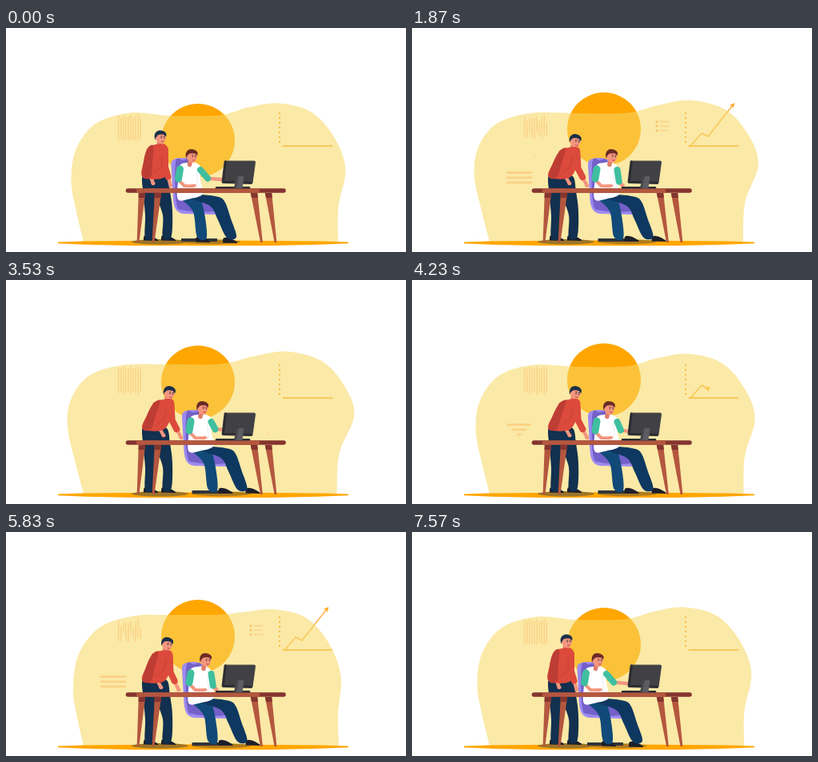
Write an HTML page with a canvas that moves like this. It is 500 by 281 pixels and loops after 7630 ms.

```html
<!DOCTYPE html>
<html lang="en">
<head>
<meta charset="utf-8">
<title>Two colleagues at a desk</title>
<style>
  html, body { margin: 0; width: 100%; height: 100%; overflow: hidden; background: #fff; }
  canvas { display: block; width: 500px; height: 281px; }
</style>
</head>
<body>
<canvas id="stage"></canvas>
<script>
const LOOP = 7630;
const canvas = document.getElementById('stage');
const ratio = window.devicePixelRatio || 1;
canvas.width = Math.round(500 * ratio);
canvas.height = Math.round(281 * ratio);
const c = canvas.getContext('2d');

const SKIN = '#f3967f', RED = '#dc4a3c', DARK_RED = '#bd3d34', NAVY = '#12304f';
const ORANGE = '#ffa600', SOFT = '#fbd083', TEAL = '#3fbf9f', INK = '#1d1f2b';
const WOOD = '#b4573f', DARK_WOOD = '#84352f';

const clamp = v => Math.max(0, Math.min(1, v));
const mix = (a, b, k) => a + (b - a) * k;
const mixPt = (p, q, k) => [mix(p[0], q[0], k), mix(p[1], q[1], k)];
const ease = (t, a, b) => (1 - Math.cos(Math.PI * clamp((t - a) / (b - a)))) / 2;
// Rises from 0 to 1 between a and b, falls back between d and e.
const pulse = (t, a, b, d, e) => ease(t, a, b) - ease(t, d, e);

function fill(color) {
  c.fillStyle = color;
  c.fill();
}

function poly(pts, color) {
  c.beginPath();
  pts.forEach(p => c.lineTo(...p));
  c.closePath();
  fill(color);
}

// Catmull-Rom outline; an open one closes with a straight edge.
function smooth(pts, color, open) {
  const n = pts.length;
  const at = i => pts[open ? Math.max(0, Math.min(n - 1, i)) : (i + n) % n];
  c.beginPath();
  c.moveTo(...pts[0]);
  for (let i = 0; i < (open ? n - 1 : n); i++) {
    const [a, b, d, e] = [at(i - 1), at(i), at(i + 1), at(i + 2)];
    c.bezierCurveTo(b[0] + (d[0] - a[0]) / 6, b[1] + (d[1] - a[1]) / 6,
      d[0] - (e[0] - b[0]) / 6, d[1] - (e[1] - b[1]) / 6, d[0], d[1]);
  }
  c.closePath();
  fill(color);
}

function line(pts, width, color, cap = 'round') {
  c.beginPath();
  pts.forEach(p => c.lineTo(...p));
  c.lineWidth = width;
  c.strokeStyle = color;
  c.lineCap = cap;
  c.lineJoin = 'round';
  c.stroke();
}

function oval(x, y, rx, ry, color) {
  c.beginPath();
  c.ellipse(x, y, rx, ry, 0, 0, 7);
  fill(color);
}

// x, y at rest and the shift when fully swollen
const BLOB = [[97, 268, 0, 0], [88, 228, -2, 0], [84, 196, -9, -14], [91, 153, -13, -3],
  [118, 119, -19, 2], [162, 105, -20, 2], [205, 103.5, 0, 0], [265, 103, 5, 0],
  [300, 100, 12, -6], [335, 97, 21, -9.5], [374, 107, 28, -6], [402, 137, 29, -2],
  [418.5, 180, 21.5, -12], [415, 228, 2, -14], [416, 268, -3, 0]];

function backdrop(t) {
  const swell = .27 - .27 * pulse(t, 0, 970, 5900, 7570) + pulse(t, 970, 2450, 2450, 5900);
  const sag = 10 * Math.sin(Math.PI * Math.sqrt(clamp(swell)));
  smooth(BLOB.map(([x, y, dx, dy]) => [
    x + dx * swell,
    y + dy * swell + (y < 150 ? sag * Math.exp(-(((x - 235) / 45) ** 2)) : 0)
  ]), 'rgba(248,216,100,.57)', true);
}

function coin(t) {
  const top = 95 - 16 * pulse(t, 0, 1200, 4550, 7570) + 5 * pulse(t, 1200, 2800, 2800, 4550);
  oval(240, top + 46, 46, 46, ORANGE);
}

const TREND = [[349, 147], [362, 132], [370, 136], [402, 95.5]];

function trend(t) {
  const u = t < 3700 ? t : t - 3700;
  const head = (u - 130) * .075, tail = Math.max(0, (u - 2550) * .1);
  const path = [];
  let from = 0, angle = 0;
  TREND.slice(1).forEach((end, i) => {
    const start = TREND[i];
    const dx = end[0] - start[0], dy = end[1] - start[1], len = Math.hypot(dx, dy);
    const a = Math.max(tail, from), b = Math.min(head, from + len);
    if (b > a) {
      path.push(mixPt(start, end, (a - from) / len), mixPt(start, end, (b - from) / len));
      angle = Math.atan2(dy, dx);
    }
    from += len;
  });
  if (!path.length) return;
  line(path, 1.4, '#fdaf3c');
  c.save();
  c.translate(...path[path.length - 1]);
  c.rotate(angle);
  poly([[2, 0], [-4.5, -3.3], [-3, 0], [-4.5, 3.3]], '#fda92a');
  c.restore();
}

function axes() {
  c.fillStyle = '#fbb02a';
  for (let y = 106; y < 145; y += 6) c.fillRect(341, y, 2, 1.6);
  for (let x = 346; x < 407; x += 2.5) c.fillRect(x, 147, 1.7, 1.8);
}

function bars(t) {
  const k = .85 - .85 * pulse(t, 0, 970, 6500, 7570) + pulse(t, 1500, 2800, 4230, 5700);
  for (let i = 0; i < 10; i++) {
    const x = 140.8 + i * 3.05, wave = Math.sin(i * 2.2);
    const mid = mix(124 + 4 * wave, 126, k), half = mix(10 + 3 * Math.cos(i * 1.7), 16 - 2 * wave, k);
    line([[x, mid - half], [x, mid + half]], 1.3, SOFT, 'butt');
  }
}

function textRows(t) {
  const grow = t < 3700 ? t : t - 3700, fade = t < 3700 ? t : t - 3520;
  for (let i = 0; i < 3; i++) {
    const k = clamp((grow - 160 - 165 * i) / 400) * (1 - clamp((fade - 2870 + 65 * i) / 400));
    const y = 181.5 + i * 6.2;
    if (k > .02) line([[134 - 15 * k, y], [134 + 15 * k, y]], 2.6, SOFT);
  }
}

function list(t) {
  const k = pulse(t, 800, 1400, 2600, 3350) + pulse(t, 4600, 5200, 6250, 7000);
  c.globalAlpha = clamp(k * 1.6);
  for (let i = 0; i < 3; i++) {
    const y = 107 + 10.5 * k + i * 5.6;
    oval(306, y, 1.6, 1.5, '#f9c468');
    line([[310, y], [320.5, y]], 1.3, SOFT);
  }
  c.globalAlpha = 1;
}

function spark(x, y, age) {
  c.globalAlpha = clamp(1.6 - Math.abs(age) / 1000);
  oval(x, y, .9, .9, SOFT);
  c.globalAlpha = 1;
}

function face(x, y, tilt, hair) {
  c.save();
  c.translate(x, y);
  c.rotate(tilt);
  line([[-1, 4], [-2, 11]], 5.5, '#de7c6c');
  smooth([[-6, -3], [0, -5], [6, -3], [6.5, 3], [3, 8], [-2, 7.5], [-5.5, 3]], SKIN);
  smooth([[-7, 2], [-7, -4], [-3, -8], [3, -8], [7, -5], [7, -1], [4, -3.2], [-2, -3], [-4.5, -1], [-4.8, 2.5]], hair);
  oval(-4.8, 1.5, 1.3, 1.8, SKIN);
  for (const eye of [1.2, 4.9]) {
    line([[eye - 1, -1], [eye + 1, -1]], .7, hair);
    oval(eye, .8, .6, .7, INK);
  }
  line([[1.5, 5], [3, 5.5], [4.3, 5]], .8, '#a83a36');
  c.restore();
}

function arm(shoulder, elbow, hand, width, color, sleeve) {
  line([elbow, hand], width * .55, SKIN);
  oval(...hand, 2.7, 1.9, SKIN);
  line([shoulder, elbow, mixPt(elbow, hand, sleeve)], width, color);
}

function shoe(x, y) {
  smooth([[x - 8, y + 3], [x - 7, y - 3], [x, y - 3], [x + 9, y + 1.5], [x + 10, y + 3.5]], INK, true);
}

function stander(t) {
  const lean = pulse(t, 300, 2000, 5500, 6500);
  const bend = ([x, y]) => [x + lean * .22 * (187 - y), y + lean * .09 * (187 - y)];
  const side = (shoulder, [ex, ey], [hx, hy], color) =>
    arm(bend(shoulder), bend([ex + 6 * lean, ey]), [hx + 13 * lean, hy], 8, color, .5);

  shoe(180, 263.5);
  shoe(202, 263.5);
  smooth([[185, 186], [201, 186], [205, 205], [208, 230], [206.5, 262], [196, 262], [196, 235], [187, 208]], NAVY);
  smooth([[171.5, 184], [191, 186], [189, 210], [185, 238], [184, 263], [174, 263], [174, 235], [171.5, 208]], NAVY);
  face(...bend([193, 137]), lean * .2, '#1d3048');
  side([180, 154], [176, 173], [184, 195], DARK_RED);
  const back = [[171, 187], [172, 168], [177, 151]];
  smooth([...back, [188, 146], [200, 147], [203, 160], [198, 187]].map(bend), RED);
  smooth([...back, [184, 148], [183, 168], [181, 187]].map(bend), DARK_RED);
  side([199, 153], [199, 175], [206, 198], RED);
  line([[195, 160], [195, 173], [186, 181]].map(bend), .8, DARK_RED);
}

function chair() {
  c.beginPath();
  c.moveTo(212, 164);
  c.bezierCurveTo(220, 162, 232, 163, 233, 168);
  c.lineTo(234, 206);
  c.bezierCurveTo(236, 215, 260, 213, 262, 219);
  c.lineTo(262, 234);
  c.lineTo(222, 233);
  c.bezierCurveTo(213, 232, 210, 226, 209, 215);
  c.lineTo(206.5, 172);
  c.bezierCurveTo(206.5, 167, 208, 165, 212, 164);
  fill('#9c8af0');
  smooth([[212, 168], [221, 166], [231, 168], [231, 208], [240, 216], [262, 221], [260, 230], [224, 229], [213, 220]], '#7460c8');
  c.fillStyle = '#33343a';
  c.fillRect(219, 264, 45, 4);
}

function sitter(slide, touch) {
  shoe(245 + slide * 15, 265.5 - slide);
  shoe(279 + slide * 15, 266.5 - slide * 2);
  smooth([[215, 208], [237, 209], [246, 223], [251, 262], [239, 262], [234, 231], [221, 216]], '#114a78');
  smooth([[222, 209], [244, 209], [266, 212], [274, 219], [281, 239], [288, 262], [276, 263], [265, 241], [256, 224], [236, 216]], '#0f3860');
  smooth([[217, 173], [226, 169], [237, 169], [244, 176], [243, 190], [246, 208], [231, 214], [215, 215], [215, 192]], '#fff');
  line([[238, 181], [240, 197]], .7, '#dfe3ee');
  face(232 + 4 * slide * (1 - touch), 160.5, .05, '#6b2b25');
}

function sitterArms(t, dx, touch) {
  const stretch = pulse(t, 5900, 6500, 6900, 7570);
  const hand = [263 + 8 * touch + 21 * stretch, 197.5 - 10 * touch];
  const shoulder = [243 + dx, 178];
  const elbow = [mix(shoulder[0], hand[0], .35), mix(shoulder[1], hand[1], .55) + 4];
  arm(shoulder, elbow, hand, 8, TEAL, 0);
  const tap = Math.sin(t / 90) * .3;
  line([[217 + dx, 192], [223 + dx, 198], [234 + dx, 198.2]], 4, SKIN);
  oval(235 + dx, 197.5 + tap, 3, 1.7, SKIN);
  line([[217.5 + dx, 177], [215.5 + dx, 189]], 9, TEAL);
}

function table() {
  for (const [top, foot] of [[170, 165], [190, 184], [310, 319.5], [328, 337]]) {
    const tip = [foot, 269], half = y => mix(4.2, 1.4, (y - 207) / 62);
    const leg = (y, side) => [mix(top, tip[0], (y - 207) / 62) + side * half(y), y];
    const part = (y, color) => poly([leg(207, -1), leg(207, 1), leg(y, 1), leg(y, -1)], color);
    part(269, WOOD);
    part(213, DARK_WOOD);
  }
  line([[152.5, 204], [347, 204]], 5.6, DARK_WOOD);
  line([[163, 204], [317, 204]], 5.6, WOOD, 'butt');
}

function monitor() {
  line([[263, 200.3], [304, 200.3]], 2.4, '#2c2d31');
  const screen = [[274.5, 168], [310, 168.5], [306.5, 194], [271.5, 193]];
  poly(screen, '#414145');
  line([...screen, screen[0]], 4, '#414145');
  line([screen[0], screen[3], screen[2]], 2.4, '#2b2c30');
  poly([[288.5, 186], [297.5, 186], [295.5, 201], [285, 201]], '#5c5c62');
  poly([[288.5, 186], [291, 186], [288, 201], [285, 201]], '#46464b');
}

function ground(slide) {
  poly([[65, 268.5], [95, 267.6], [246, 266.2], [395, 267.6], [428, 268.5], [428, 270.3],
    [390, 271.8], [330, 273], [160, 273], [100, 271.8], [65, 270.3]], ORANGE);
  oval(192.5, 268.2, 35.5, 3.2, '#9d7427');
  oval(256 + slide * 13, 268.2, 37, 3, '#b07c1c');
}

function draw(t) {
  c.setTransform(ratio, 0, 0, ratio, 0, 0);
  c.fillStyle = '#fff';
  c.fillRect(0, 0, 500, 281);

  const slide = pulse(t, 0, 900, 6600, 7500), dx = slide * 13.5;
  const touch = .75 - .75 * pulse(t, 0, 900, 6900, 7570) + pulse(t, 1800, 2700, 3900, 5000);

  coin(t);
  trend(t);
  backdrop(t);
  axes();
  bars(t);
  textRows(t);
  list(t);
  spark(153.5, 159.5, t - 1900);
  spark(327.5, 191, t - 3500);
  ground(slide);
  stander(t);
  c.save();
  c.translate(dx, 0);
  chair();
  sitter(slide, touch);
  c.restore();
  table();
  sitterArms(t, dx, touch);
  monitor();
}

const start = performance.now();
function tick() {
  draw((performance.now() - start) % LOOP);
  requestAnimationFrame(tick);
}
tick();
</script>
</body>
</html>
```
